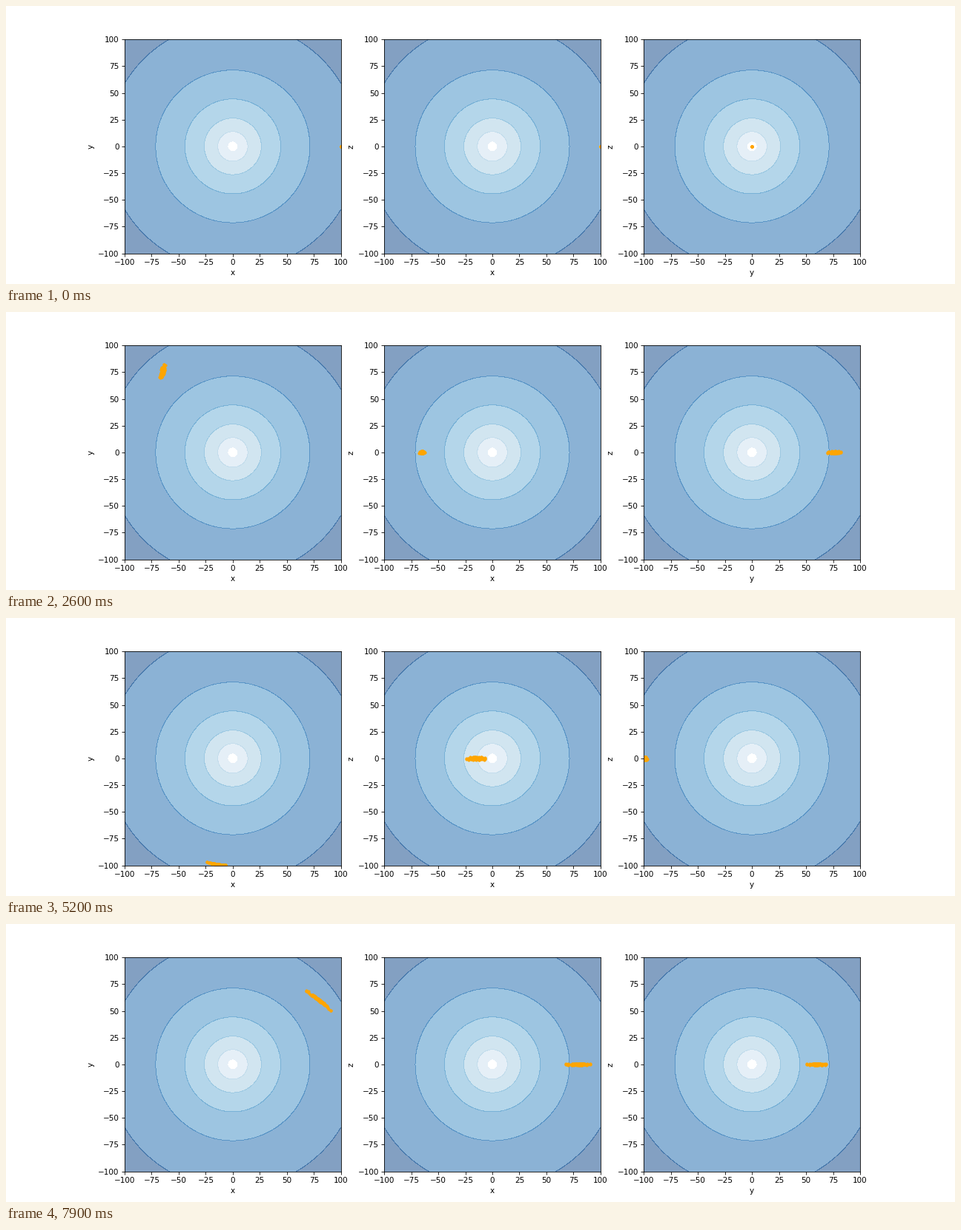
Write a matplotlib script that moves like this. It is 1280 by 376 pixels and loops after 8 s.

```python
import numpy as np
import matplotlib.pyplot as plt
from matplotlib.animation import FuncAnimation

FRAMES, STEP_MS, SUBSTEPS = 80, 100, 20
DPI = 75
R0 = 100.0                    # orbit radius
OMEGA = np.radians(50.25)     # orbital rate per second
KAPPA = 1.2                   # radial epicycle rate
MAX_KICK = 1.5

plt.rcParams["font.family"] = "DejaVu Sans"


def make_kicks(count=100, sigma=0.58):
    """Radial, tangential and vertical velocity kicks of the cluster."""
    kicks = np.random.default_rng(4).normal(0, sigma, (count, 3))
    speed = np.hypot(kicks[:, 0], kicks[:, 1])
    kicks[:, :2] *= np.minimum(1, MAX_KICK / speed)[:, None]
    kicks[:, 2] = np.clip(kicks[:, 2], -1.25, 1.25)
    tip = np.array([0.45, 1.43, 0])
    return np.vstack([kicks, tip, -tip])


def gravity(pos):
    """Central power-law force with the wanted orbital and radial rates."""
    r = np.linalg.norm(pos, axis=1, keepdims=True)
    return -OMEGA**2 * (r / R0) ** (KAPPA**2 / OMEGA**2 - 4) * pos


def integrate():
    """Leapfrog the cluster, one array of (x, y, z) rows per frame."""
    vel = make_kicks() + [0, OMEGA * R0, 0]
    pos = np.zeros_like(vel) + [R0, 0, 0]
    dt = STEP_MS / 1000 / SUBSTEPS
    track = []
    for _ in range(FRAMES):
        track.append(pos.T.copy())
        for _ in range(SUBSTEPS):
            vel += gravity(pos) * dt / 2
            pos += vel * dt
            vel += gravity(pos) * dt / 2
    return track


def limits(values):
    """Keep +-100 unless the data leaves it, then add a 5 % margin."""
    low, high = min(values.min(), -R0), max(values.max(), R0)
    pad = 0.05 * (high - low)
    return (low - pad if low < -R0 else low,
            high + pad if high > R0 else high)


def draw_potential(ax):
    axis = np.linspace(-100, 100, 101)
    gx, gy = np.meshgrid(axis, axis)
    radii = [4.9, 13.9, 26.4, 44.3, 71.3, 116, 150]
    shades = plt.cm.Blues((np.arange(1, 7) + 0.5) / 7)
    ax.contourf(gx, gy, np.hypot(gx, gy), levels=radii,
                colors=shades, alpha=0.5)


TRACK = integrate()
PANELS = [(0, 1), (0, 2), (1, 2)]

fig, axes = plt.subplots(1, 3, figsize=(1280 / DPI, 376 / DPI), dpi=DPI)
fig.subplots_adjust(left=0.125, right=0.9, bottom=0.11, top=0.88, wspace=0.2)
dots = []
for ax, (h, v) in zip(axes, PANELS):
    draw_potential(ax)
    ax.set_xlabel("xyz"[h])
    ax.set_ylabel("xyz"[v])
    dots += ax.plot([], [], ls="none", marker=".", ms=6, color="orange")


def update(frame):
    coords = TRACK[frame]
    for ax, dot, (h, v) in zip(axes, dots, PANELS):
        dot.set_data(coords[h], coords[v])
        ax.set_xlim(limits(coords[h]))
        ax.set_ylim(limits(coords[v]))
    return dots


anim = FuncAnimation(fig, update, frames=FRAMES, interval=STEP_MS,
                     init_func=lambda: update(0), repeat=True, repeat_delay=0)
plt.show()
```
